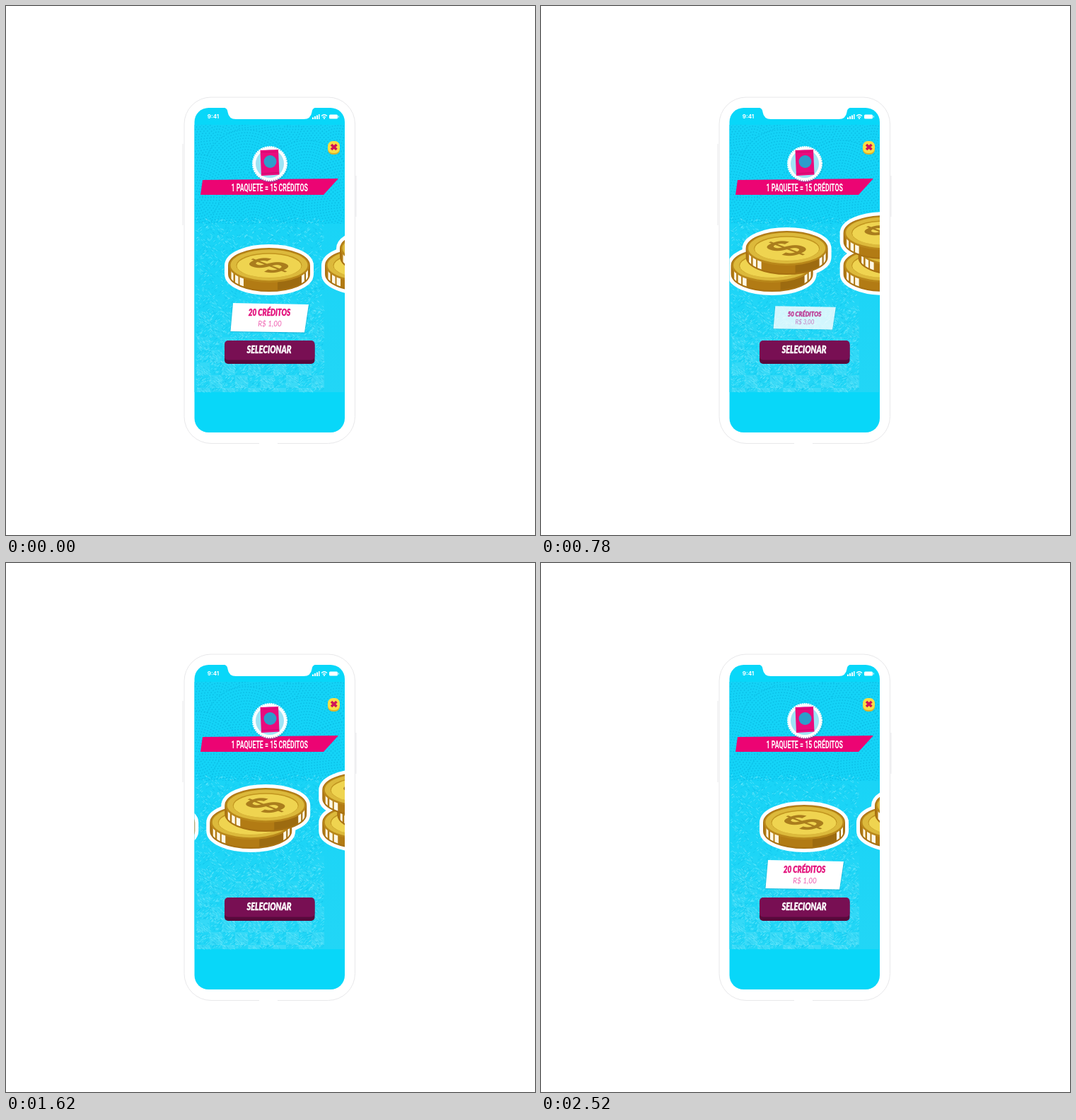
These frames come from a looping animation (748 by 748 pixels, 2670 ms). An HTML page:

```html
<!DOCTYPE html>
<html lang="pt">
<head>
<meta charset="utf-8">
<title>Créditos</title>
<style>
html, body { margin: 0; width: 100%; height: 100%; overflow: hidden; background: #fff; }
svg { display: block; width: 100vw; height: 100vh; }
text { text-anchor: middle; }
.comic { font: italic 900 12.5px Lato, "Open Sans", sans-serif; stroke-width: .35; }
.narrow { font: 700 14px Roboto, "Liberation Sans", sans-serif; }
.price { font: italic 400 11.5px Lato, "Open Sans", sans-serif; }
.dollar { font: 700 62px "Liberation Sans", sans-serif; fill: #aa7d1d; }
</style>
</head>
<body>
<svg viewBox="0 0 748 748">
  <defs>
    <clipPath id="screen"><rect x="266.5" y="144" width="212.5" height="459" rx="20"/></clipPath>
    <clipPath id="upper"><rect x="267" y="168" width="211" height="140"/></clipPath>
    <clipPath id="bodyClip"><path d="M-57 0A57 24 0 0 1 57 0V12A57 24 0 0 1-57 12Z"/></clipPath>
    <linearGradient id="tint" x1="0" y1="0" x2="0" y2="1">
      <stop offset="0" stop-color="#14d3f7"/>
      <stop offset="1" stop-color="#22d6f6"/>
    </linearGradient>
    <linearGradient id="fade" x1="0" y1="0" x2="0" y2="1">
      <stop offset="0" stop-color="#fff" stop-opacity="0"/>
      <stop offset="1" stop-color="#fff" stop-opacity=".12"/>
    </linearGradient>
    <path id="body" d="M-57 0A57 24 0 0 1 57 0V12A57 24 0 0 1-57 12Z"/>
    <g id="coin">
      <use href="#body" fill="#b27b14"/>
      <g clip-path="url(#bodyClip)">
        <path d="M12 0H57V40H12Z" fill="#9d6b10"/>
        <path d="M-53.500 5h3v30h-3zM-48 5h4.500v30h-4.500zM-41.500 5h5.500v30h-5.500zM46 5h4v30h-4zM52 5h3v30h-3z" fill="#fff8e6"/>
      </g>
      <use href="#body" fill="none" stroke="#a87112" stroke-width="2"/>
      <ellipse rx="57" ry="24" fill="#b9871a"/>
      <ellipse cy="-.6" rx="54.5" ry="21.8" fill="#dcb93b"/>
      <ellipse cy="-.3" rx="46.5" ry="17.5" fill="#c1951f"/>
      <ellipse cy=".4" rx="45.500" ry="16.600" fill="#efd450"/>
      <text class="dollar" y="20.500" transform="matrix(.9 -.36 .95 .36 0 0)">$</text>
    </g>
  </defs>

  <rect width="748" height="748" fill="#fff"/>
  <g fill="#fff" stroke="#e8e8ea">
    <path d="M250 195v115M495 240v58"/>
    <rect x="252" y="129" width="241.500" height="489.500" rx="38"/>
    <path d="M358 618.500h26" stroke="#fff"/>
  </g>

  <g clip-path="url(#screen)">
    <rect x="266" y="144" width="214" height="460" fill="#08d7f9"/>
    <rect x="266" y="168" width="212" height="378" fill="url(#tint)"/>
    <g id="scales" clip-path="url(#upper)" fill="#14d3f7" stroke="#08b4de" stroke-opacity=".75" stroke-width="1.400" stroke-dasharray="1.600 2.400"/>
    <path id="tiles" fill="url(#fade)"/>
    <path id="grain" fill="none" stroke="#0bbbe4" stroke-opacity=".5" stroke-width=".9"/>
    <path id="weave" fill="none" stroke="#7ceafb" stroke-opacity=".6" stroke-width=".9"/>
    <path d="M306 143Q313 144 313.500 150Q315 160 325 160H421Q431 160 432.500 150Q433 144 440 143Z" fill="#fff"/>

    <g id="track"></g>

    <g id="tag">
      <path d="M320 421.500L429 423L422.500 463L316.500 461Z" fill="#0a9fc4" opacity=".45"/>
      <path d="M321 420L428 422L422 461.500L317.500 460Z" fill="#fff"/>
      <g transform="translate(372.500 438) scale(.8 1)"><text id="amount" class="comic" fill="#e3127c" stroke="#e3127c"></text></g>
      <g transform="translate(373 452.500) scale(.87 1)"><text id="price" class="price" fill="#ef63b2"></text></g>
    </g>
  </g>

  <g fill="#fff">
    <text x="293" y="159" font-family="Inter, Roboto, sans-serif" font-size="8" font-weight="700">9:41</text>
    <path d="M433 157.500h2v2.500h-2zM436 156h2v4h-2zM439 154.500h2v5.500h-2zM442 153h1.500v7h-1.500z"/>
    <path d="M446 155.500q4-3.600 8 0M447.800 157.500q2.200-1.800 4.400 0" fill="none" stroke="#fff" stroke-width="1.300"/>
    <circle cx="450" cy="159" r="1"/>
    <rect x="457" y="153.500" width="12" height="6" rx="1.500"/>
    <rect x="469.700" y="155.300" width="1" height="2.400"/>
  </g>

  <rect x="455" y="192" width="17" height="18" rx="7" fill="#d8b22c"/>
  <rect x="455" y="191" width="17" height="17" rx="7" fill="#f8de45"/>
  <path d="M460 196L467.500 203M467.500 196L460 203" stroke="#d01458" stroke-width="3.600"/>

  <path d="M278 246L470 244L449 267L275 267Z" fill="#ec0473"/>
  <circle cx="374" cy="224.500" r="25" fill="#0999bd" opacity=".3"/>
  <circle cx="373" cy="223" r="23.500" fill="#fff"/>
  <circle cx="373" cy="223" r="23.800" fill="none" stroke="#fff" stroke-width="2.600" stroke-linecap="round" stroke-dasharray="0 3"/>
  <circle cx="373" cy="223" r="20" fill="#9fe4f5"/>
  <path d="M359.500 204L385 203L386.500 238.500L361 240Z" fill="#ea0b7d"/>
  <path d="M360 207L385 206M361 237L386 235.500" stroke="#c40868" stroke-width=".8"/>
  <circle cx="373.500" cy="220" r="9" fill="#2d9dcb"/>
  <g transform="translate(372.700 262) scale(.63 1)"><text class="narrow" fill="#fff">1 PAQUETE = 15 CRÉDITOS</text></g>

  <rect x="309" y="475" width="127.500" height="31" rx="5" fill="#570a3c"/>
  <rect x="309" y="473" width="127.500" height="27.500" rx="5" fill="#780f53"/>
  <g transform="translate(372 491) scale(.76 1)"><text class="comic" style="font-size:14.500px" fill="#fff" stroke="#fff">SELECIONAR</text></g>
</svg>

<script>
const $ = id => document.getElementById(id);

// Background texture
let seed = 7;
const random = () => (seed = seed * 16807 % 2147483647) / 2147483647;
const TILE = 18;

const centres = [[300, 190], [390, 170], [470, 205], [340, 235], [425, 250], [270, 270], [480, 285], [350, 315]];
$('scales').innerHTML = centres.map(([x, y]) =>
  Array.from({ length: 15 }, (_, i) => `<circle cx="${x}" cy="${y}" r="${60 - i * 4}"/>`).join('')).join('');

// Short strokes whose direction alternates from tile to tile
function dashes(count, left, top, width, height) {
  let d = '';
  for (let i = 0; i < count; i++) {
    const x = left + random() * width, y = top + random() * height;
    const a = (Math.floor(x / TILE) + Math.floor(y / TILE)) % 2 ? .6 : -.6;
    d += `M${x.toFixed(1)} ${y.toFixed(1)}l${(3 * Math.cos(a)).toFixed(1)} ${(3 * Math.sin(a)).toFixed(1)}`;
  }
  return d;
}
$('weave').setAttribute('d', dashes(800, 268, 300, 180, 130) + dashes(1500, 268, 430, 180, 115));
$('grain').setAttribute('d', dashes(900, 268, 300, 180, 130) + dashes(900, 268, 430, 180, 115));

let tiles = '';
for (let y = 396; y < 546; y += TILE)
  for (let x = 270; x < 450; x += TILE)
    if ((x + y) / TILE % 2) tiles += `M${x} ${y}h${TILE}v${Math.min(TILE, 546 - y)}h${-TILE}z`;
$('tiles').setAttribute('d', tiles);

// Coin stacks, back to front
const stacks = [
  [[372, 367]],
  [[509, 367], [530, 343]],
  [[668, 367], [689, 344], [668, 321]]
];
const place = (id, extra = '') => ([x, y]) => `<use href="#${id}" x="${x}" y="${y}" ${extra}/>`;
$('track').innerHTML = stacks.map(s =>
  s.map(place('body', 'fill="#fff" stroke="#fff" stroke-width="12"')).join('') +
  s.map(place('coin')).join('')).join('');

const offsets = [0, -147, -306];
const labels = [['20 CRÉDITOS', 'R$ 1,00'], ['50 CRÉDITOS', 'R$ 3,00'], ['150 CRÉDITOS', 'R$ 5,00']];
const moves = [[60, 0, 1], [780, 1, 2], [1500, 2, 1], [2220, 1, 0]];
const LOOP = 2670, STEP = 30, LAST = 11;

function draw(time) {
  const t = time % LOOP;
  const [start, from, to] = moves.filter(m => m[0] <= t).pop() || [-1000, 0, 0];
  let k = Math.min(LAST, Math.floor((t - start) / STEP) + 1);
  if (k === 6) k = 5; // the middle step is held
  const slide = Math.sin(Math.min(1, k / 7) * Math.PI / 2);
  const x = offsets[from] + (offsets[to] - offsets[from]) * slide;
  $('track').setAttribute('transform', `translate(${x.toFixed(2)} 0)`);

  const size = k <= 5 ? 1 - k / 5 : (k - 6) / 5;
  const [amount, price] = labels[k <= 5 ? from : to];
  $('tag').setAttribute('transform', `translate(372.5 441) scale(${size}) translate(-372.5 -441)`);
  $('tag').setAttribute('opacity', size);
  $('amount').textContent = amount;
  $('price').textContent = price;
}

const begin = performance.now();
function tick() {
  draw(performance.now() - begin);
  requestAnimationFrame(tick);
}
tick();
</script>
</body>
</html>
```
